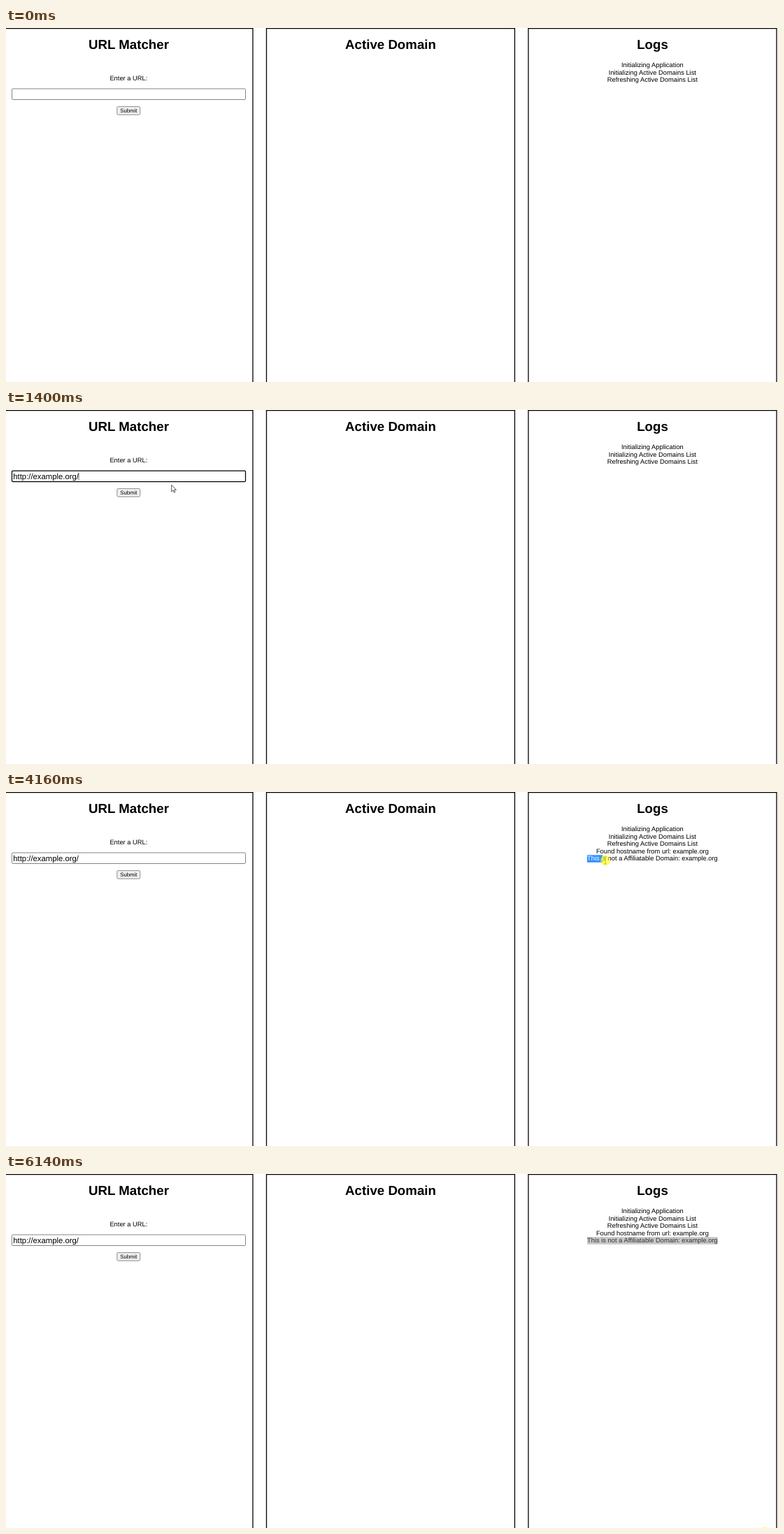
Write an HTML page that moves like this. It is 1104 px wide and 507 px high and loops after 6220 ms.

```html
<!DOCTYPE html>
<html lang="en">
<head>
<meta charset="utf-8">
<title>URL Matcher</title>
<style>
  html, body { margin: 0; width: 100%; height: 100%; overflow: hidden; background: #fff; }
  svg { display: block; }
  text { font: 9.36px "Liberation Sans", Arial, sans-serif; text-anchor: middle; white-space: pre; text-rendering: geometricPrecision; }
  .title { font-size: 18.7px; font-weight: bold; }
  .button { font-size: 7.8px; }
  .field { font-size: 11.3px; text-anchor: start; }
  .option { font: 600 7.27px "Open Sans", "Noto Sans", sans-serif; text-anchor: start; fill: #fff; }
  .panel { fill: none; stroke: #000; stroke-width: 1.3; }
</style>
</head>
<body>
<svg width="1104" height="507" viewBox="0 0 1104 507">
  <g id="panels"></g>
  <text x="175.4" y="75.2">Enter a URL:</text>
  <rect id="input" x="8.5" y="87" width="334" height="15.5" rx="1.3" fill="#fff"/>
  <text id="url" class="field" x="10.3" y="98.6">http://example.org/</text>
  <path id="caret" stroke="#000" stroke-width=".6"/>
  <rect id="button" x="158.8" y="112.6" width="33" height="11.6" rx="1.5" stroke="#767676" stroke-width=".8"/>
  <text class="button" x="175.4" y="121.3">Submit</text>

  <text x="924.4" y="56.3">Initializing Application</text>
  <text x="924.4" y="66.8">Initializing Active Domains List</text>
  <text x="924.4" y="77.4">Refreshing Active Domains List</text>
  <g id="result">
    <text x="924.4" y="87.9">Found hostname from url: example.org</text>
    <rect id="mark" y="90.2" height="10.6"/>
    <text id="line" x="924.4" y="98.4"><tspan id="picked"></tspan><tspan id="rest"></tspan></text>
  </g>

  <g id="list">
    <rect x="7.5" y="104" width="268.5" height="52.5" rx="2.5" opacity=".15"/>
    <rect x="8.2" y="103.8" width="267" height="51.4" rx="2" fill="#292a2d"/>
    <clipPath id="edge"><rect x="10" y="104" width="258" height="50"/></clipPath>
    <g clip-path="url(#edge)">
      <text class="option" x="15" y="121.4">https://www.google.com/webhp?hl=en&amp;ictx=2&amp;sa=X&amp;ved=0ahUKEwio2-</text>
      <text class="option" x="15" y="142.6">https://www.walmart.com/</text>
    </g>
  </g>

  <g id="pointer">
    <path id="beam" d="M-2.2-5H2.2M0-5V5M-2.2 5H2.2" fill="none" stroke="#444" stroke-width=".8"/>
    <circle id="click" r="7" fill="#ff0" fill-opacity=".6"/>
    <path id="arrow" d="M0 0V9.7L2.3 7.6 3.8 11 5.2 10.4 3.8 7.1H6.7Z" fill="#fff" stroke="#000" stroke-width=".65"/>
  </g>
</svg>
<script>
const LOOP = 6220;
const STEP = 78.5;
const MESSAGE = 'This is not a Affiliatable Domain: example.org';
const $ = id => document.getElementById(id);

$('panels').innerHTML = ['URL Matcher', 'Active Domain', 'Logs'].map((title, i) => {
  const middle = 175.5 + 374.5 * i;
  return `<rect class="panel" x="${middle - 177.5}" y=".6" width="355" height="600"/>
    <text class="title" x="${middle}" y="30">${title}</text>`;
}).join('');

// Each leg curves from the previous resting place, past `via`, to `to`.
const entry = [995, 470];
const legs = [
  { start: 70, end: 540, via: [500, 200], to: [268, 98] },
  { start: 1400, end: 1480, via: [240, 105], to: [198.7, 121] },
  { start: 1710, end: 1950, to: [181.5, 120.5] },
  { start: 2260, end: 2660, via: [184, 160], to: [196, 246] },
  { start: 3280, end: 3840, via: [905, 430], to: [1000, 98] },
  { start: 3920, end: 4000, to: [824, 98] },
  { start: 4080, end: 4480, via: [853, 101], to: [1006, 86] },
  { start: 4560, end: 4720, to: [1038, 95] },
  { start: 5030, end: 5590, via: [1060, 150], to: [1077, 494.5] },
  { start: 5670, end: 5750, to: [1075.5, 501] },
  { start: 6140, end: 6140, to: [1085, 512.5] }
];

const within = (t, a, b) => t >= a && t < b;
const show = (id, on) => $(id).style.display = on ? '' : 'none';
const set = (id, attrs) => {
  for (const name in attrs) $(id).setAttribute(name, attrs[name]);
};

function pointerAt(t) {
  const index = legs.filter(leg => leg.start <= t).length - 1;
  if (index < 0) return null;
  const { start, end, via, to } = legs[index];
  const from = index ? legs[index - 1].to : entry;
  const last = Math.round((end - start) / STEP);
  const step = Math.min(last, Math.floor((t - start) / STEP + .02));
  const u = (step + 1) / (last + 1), v = 1 - u;
  return from.map((a, k) => {
    const bend = via ? via[k] : (a + to[k]) / 2;
    return v * v * a + 2 * u * v * bend + u * u * to[k];
  });
}

$('rest').textContent = MESSAGE;
const ends = [...MESSAGE].map((c, i) => $('line').getEndPositionOfChar(i).x);
const left = $('line').getStartPositionOfChar(0).x;

function selectedCount(t, x, y) {
  if (t < 4160 || y < 90 && t < 4560) return 0;
  if (t >= 4560) return MESSAGE.length;
  return ends.filter((end, i) => (end + (i ? ends[i - 1] : left)) / 2 < x - 2).length;
}

function draw(t) {
  const spot = pointerAt(t);
  const [x, y] = spot || [-99, -99];
  const overInput = x > 8 && x < 343 && y > 87 && y < 103;
  const overButton = x > 158 && x < 192 && y > 112 && y < 125;
  const overLog = t >= 2260 && x > 830 && x < 1019 && y > 79 && y < 101;
  const focused = within(t, 700, 2100);
  const pressed = within(t, 2100, 2260);
  const typed = t >= 1170;

  set('input', {
    stroke: focused ? '#000' : overInput ? '#4f4f4f' : '#767676',
    'stroke-width': focused ? 1.25 : .9
  });
  show('url', typed);
  show('list', within(t, 780, 1170));
  set('caret', { d: typed ? 'M104 89.5V100.5' : 'M11 89.5V100.5' });
  show('caret', within(t, 700, 1710));
  set('button', { fill: pressed ? '#f5f5f5' : overButton ? '#e5e5e5' : '#efefef' });
  show('result', t >= 2260);

  const count = selectedCount(t, x, y);
  const idle = t >= 6140;
  $('picked').textContent = MESSAGE.slice(0, count);
  $('rest').textContent = MESSAGE.slice(count);
  set('picked', { fill: idle ? '#323232' : '#fff' });
  set('mark', {
    x: left,
    width: count ? ends[count - 1] - left : 0,
    fill: idle ? '#c8c8c8' : '#3390ff'
  });

  show('pointer', spot);
  set('pointer', { transform: `translate(${x} ${y})` });
  show('beam', overInput || overLog);
  show('arrow', !overInput && !overLog);
  show('click', within(t, 700, 780) || pressed || within(t, 4080, 5030) || idle);
}

const began = performance.now();
function tick() {
  draw((performance.now() - began) % LOOP);
  requestAnimationFrame(tick);
}
tick();
</script>
</body>
</html>
```
